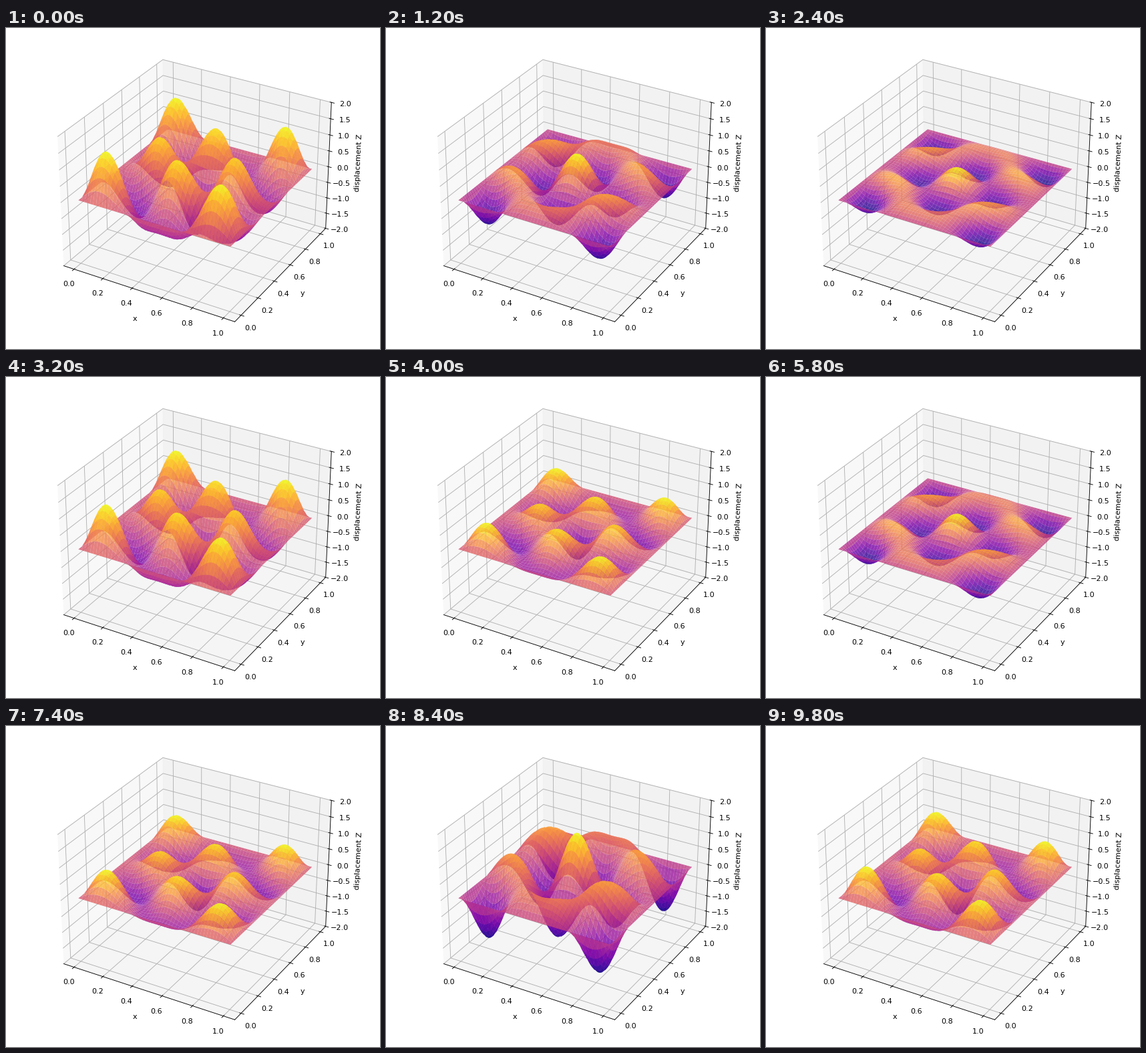
Recreate the animation shown at these times as a matplotlib script. Size 560 by 480 pixels, loop 10000 ms.

```python
import numpy as np
import matplotlib.pyplot as plt
from matplotlib.animation import FuncAnimation

FRAMES = 50
INTERVAL = 200
DT = 0.02
MODE = (3, 5)
WEIGHTS = (1.0, 0.6)
OMEGA = np.pi * np.hypot(*MODE)

fig = plt.figure(figsize=(7, 6), dpi=80)
ax = fig.add_axes([0.025, 0.025, 0.95, 0.95], projection="3d")

side = np.linspace(0, 1, 100)
X, Y = np.meshgrid(side, side)


def mode(m, n):
    return np.sin(m * np.pi * X) * np.sin(n * np.pi * Y)


# Two degenerate modes of a square membrane share one frequency.
m, n = MODE
SHAPE = WEIGHTS[0] * mode(m, n) + WEIGHTS[1] * mode(n, m)
surface = None


def draw(i):
    global surface
    if surface is not None:
        surface.remove()
    Z = SHAPE * np.cos(OMEGA * DT * i)
    surface = ax.plot_surface(X, Y, Z, cmap="plasma", alpha=0.8)
    ax.set_zlim(-2, 2)
    return [surface]


ax.set_xlabel("x")
ax.set_ylabel("y")
ax.set_zlabel("displacement Z")

anim = FuncAnimation(fig, draw, frames=FRAMES, interval=INTERVAL,
                     init_func=lambda: draw(0), repeat=True, repeat_delay=0)
plt.show()
```
